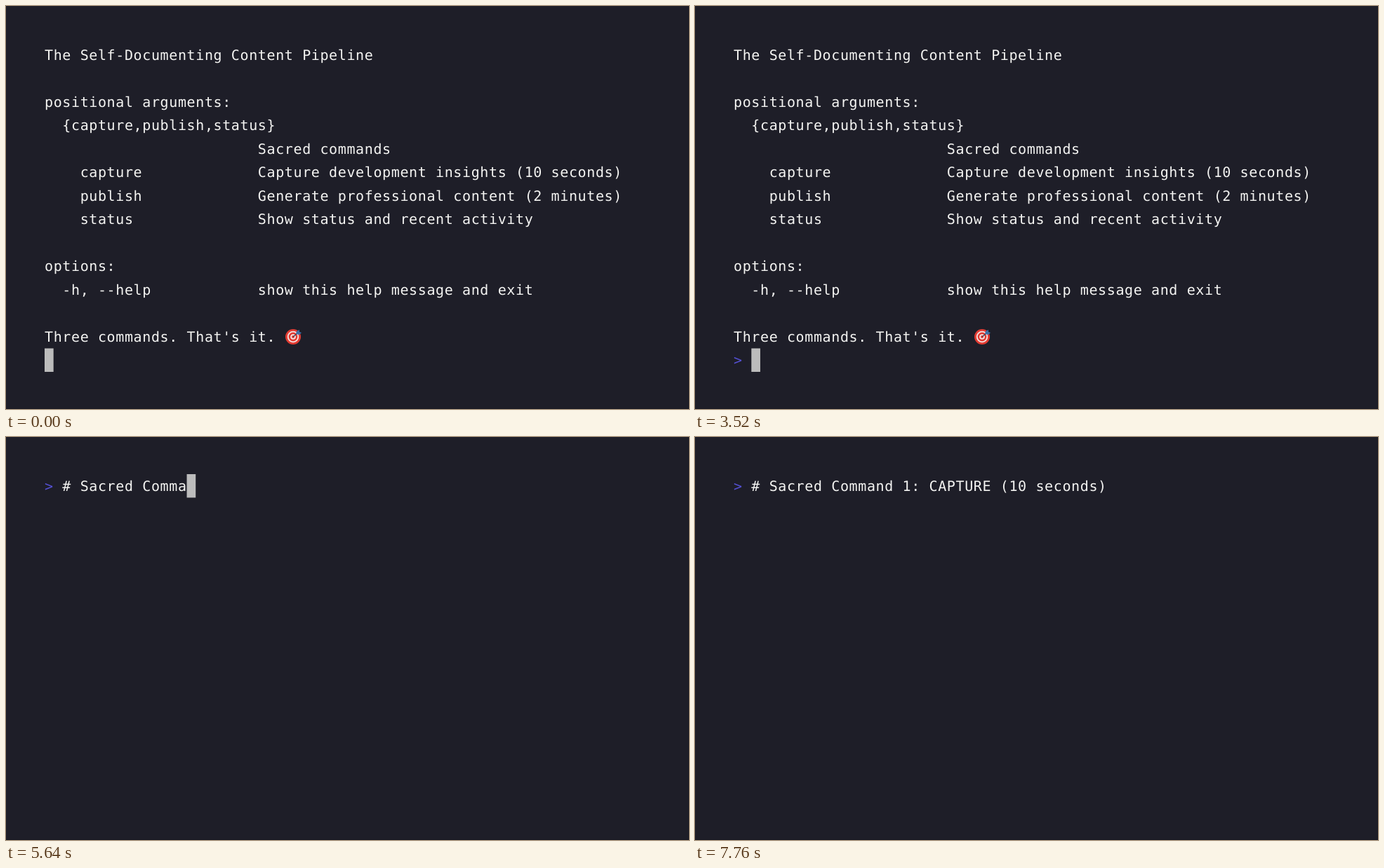
Animation of 973 by 575 pixels, one loop 8000 ms. Source, as an HTML page with a canvas:

```html
<!DOCTYPE html>
<html lang="en">
<head>
<meta charset="utf-8">
<title>Terminal</title>
<style>
  html, body { margin: 0; width: 100%; height: 100%; overflow: hidden; background: #1e1e28; }
  canvas { display: block; }
</style>
</head>
<body>
<canvas width="973" height="575"></canvas>
<script>
const ctx = document.querySelector("canvas").getContext("2d");
const LOOP = 8000, TICK = 40;
const LEFT = 55, TOP = 53, CELL = 12.66, LINE = 33.5, BASELINE = 23.9;
const BLINK = 582, CLEAR_AT = 4840, KEY_MS = 59.4;
const TEXT = "#f4f4f2", PROMPT = "#5450d2", CURSOR = "#bcbcbc";

const help = `The Self-Documenting Content Pipeline

positional arguments:
  {capture,publish,status}
                        Sacred commands
    capture             Capture development insights (10 seconds)
    publish             Generate professional content (2 minutes)
    status              Show status and recent activity

options:
  -h, --help            show this help message and exit

Three commands. That's it.`.split("\n");
const command = "# Sacred Command 1: CAPTURE (10 seconds)";
const typedAt = CLEAR_AT + (command.length - 1) * KEY_MS;

function write(text, col, row, color = TEXT) {
  ctx.fillStyle = color;
  [...text].forEach((char, i) =>
    ctx.fillText(char, LEFT + (col + i) * CELL, TOP + BASELINE + row * LINE));
}

function drawCursor(col, row) {
  ctx.fillStyle = CURSOR;
  ctx.fillRect(LEFT + col * CELL, TOP + row * LINE, CELL, LINE);
}

function drawTarget(x, y) {
  [11, 8.2, 6.4, 3.8, 2].forEach((radius, i) => {
    ctx.fillStyle = i % 2 ? "#f3e6e4" : "#e23b32";
    ctx.beginPath();
    ctx.arc(x, y, radius, 0, 7);
    ctx.fill();
  });
  ctx.strokeStyle = "#35495f";
  ctx.lineWidth = 1.4;
  ctx.stroke(new Path2D(`M${x} ${y}l6-5`));
  ctx.fillStyle = "#3b6fa5";
  ctx.fill(new Path2D(`M${x + 4} ${y - 4}l1-4 4-2 0 3 3 1-3 3z`));
}

function draw(time) {
  ctx.fillStyle = "#1e1e28";
  ctx.fillRect(0, 0, 973, 575);
  ctx.fillStyle = "#181821";
  ctx.fillRect(0, 574, 973, 1);
  ctx.fillRect(972, 0, 1, 575);
  ctx.font = '20px "DejaVu Sans Mono", monospace';
  ctx.textRendering = "geometricPrecision";

  const cleared = time >= CLEAR_AT;
  const row = cleared ? 0 : help.length;
  const typed = cleared ? command.slice(0, Math.floor((time - CLEAR_AT) / KEY_MS) + 1) : "";
  if (!cleared) {
    help.forEach((line, i) => write(line, 0, i));
    drawTarget(409, 472);
  }
  if (time < TICK) return drawCursor(0, row);

  write(">", 0, row, PROMPT);
  write(typed, 2, row);
  // The cursor stays lit while typing and blinks when idle.
  const idle = cleared ? Math.max(0, time - typedAt) : time;
  if (Math.floor(idle / BLINK) % 2 === 0) drawCursor(2 + typed.length, row);
}

function frame(now) {
  draw(Math.floor(now % LOOP / TICK) * TICK);
  requestAnimationFrame(frame);
}
draw(0);
requestAnimationFrame(frame);
</script>
</body>
</html>
```
